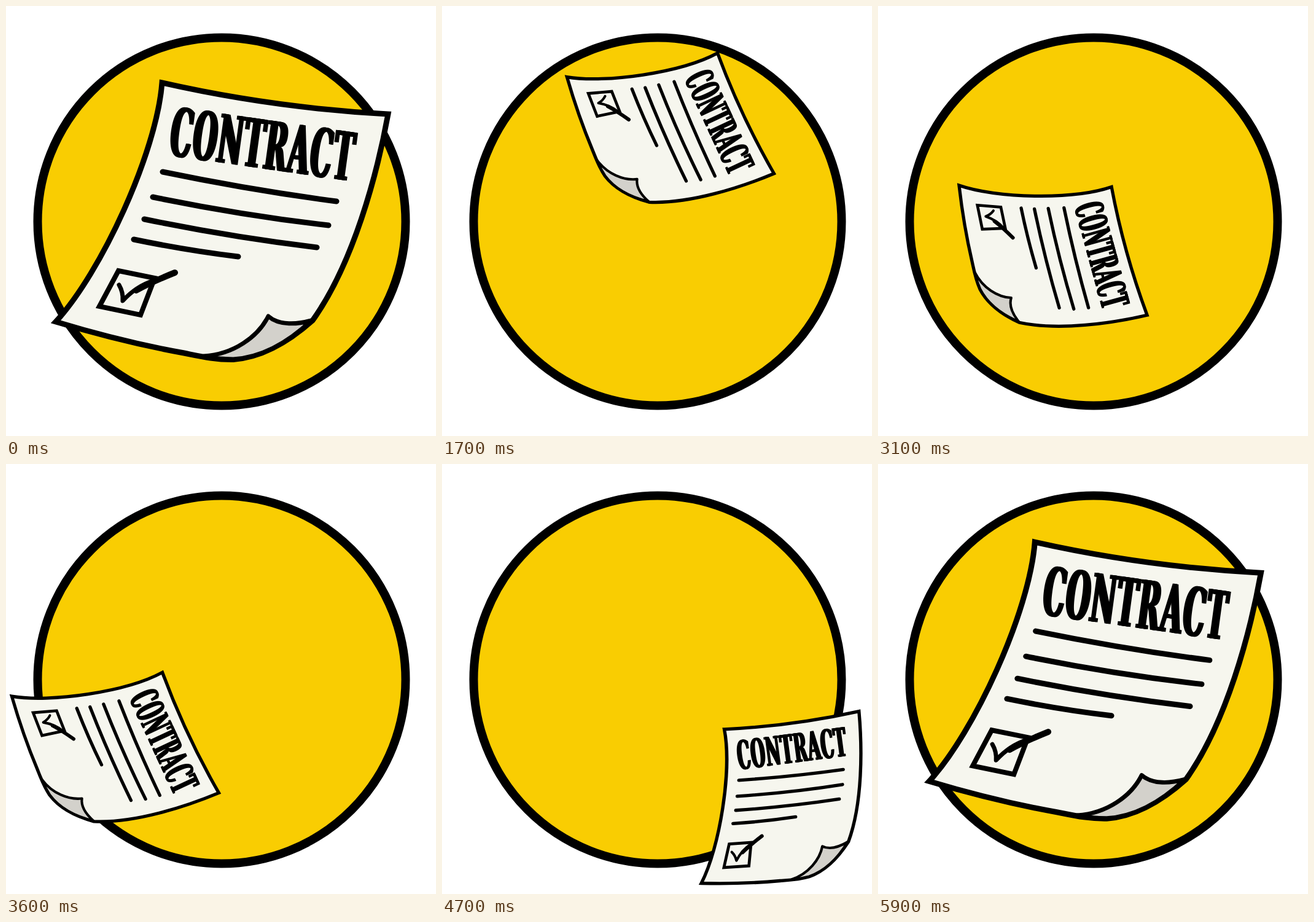
An HTML page that plays this animation: 700x700 px, repeating every 6000 ms.

```html
<!DOCTYPE html>
<html>
<head>
<meta charset="utf-8">
<style>
  html, body { margin: 0; width: 100%; height: 100%; overflow: hidden; background: #fff; }
  svg { display: block; width: 100vw; height: 100vh; }
  text { font: bold 100px "DejaVu Serif", serif; text-anchor: middle; letter-spacing: 4px; }
</style>
</head>
<body>
<svg viewBox="0 0 700 700">
  <circle cx="351" cy="351" r="299.5" fill="#f9cd02" stroke="#000" stroke-width="14"/>
  <g id="paper" fill="none" stroke="#000" stroke-width="9">
    <path fill="#f6f6ee" stroke-miterlimit="8" d="M254 125Q435 166 622 176C604 275 565 420 499 512
      C462 545 418 572 370 575.5C340 576 315 570 290 565Q190 547 81 514C155 434 245 239 254 125Z"/>
    <path fill="#d3d1cb" stroke-width="7" stroke-linejoin="round" d="M322 570C370 567 410 539 427 505
      C445 521 475 518 497 512C462 545 418 572 370 575Q345 575 322 570Z"/>
    <g transform="matrix(.44 .063 -.15 1.08 413 264)" fill="#000" stroke="none">
      <text id="title">CONTRACT</text>
      <use href="#title" x="-5"/>
      <use href="#title" x="5"/>
    </g>
    <g stroke-linecap="round">
      <path d="M255 270Q400 300 538 318M239 311Q385 341 525 357M225 347Q365 376 506 393M208 380Q295 398 378 408"/>
      <path stroke-width="8" d="M183 431L242 443L219 503L152 489Z"/>
      <path stroke-width="7" stroke-linejoin="round" d="M184 454Q191 466 190 480Q212 456 240 447"/>
      <path stroke-width="10" d="M212 463Q235 450 275 434"/>
    </g>
  </g>
</svg>
<script>
const LOOP = 6000, STEP = 100, SMALL = .583;

// Points of the flight: time, centre x, centre y, angle
const flight = [
  [450, 350, 350, 0],
  [800, 349, 349, 24.7],
  [1100, 368, 222, 45],
  [1400, 382, 130, 52],
  [1700, 369, 195, 57],
  [1800, 372, 196, 58],
  [2500, 545, 258, 106],
  [3100, 282, 398, 66.6],
  [3550, 173, 452, 58],
  [4100, 319.5, 510, 45.5],
  [4600, 557, 552, -16],
  [5300, 411, 410, -4.8],
  [6000, 350, 350, 0]
];

const slope = (i, c) => (flight[i + 1][c] - flight[i][c]) / (flight[i + 1][0] - flight[i][0]);

// Monotone tangent: flat at turning points and at both ends
function tangent(i, c) {
  if (i === 0 || i === flight.length - 1) return 0;
  const a = slope(i - 1, c), b = slope(i, c);
  return a * b <= 0 ? 0 : 2 * a * b / (a + b);
}

function valueAt(t, c) {
  if (t <= flight[0][0]) return flight[0][c];
  const i = flight.findIndex(p => p[0] > t) - 1;
  const a = flight[i], b = flight[i + 1];
  const span = b[0] - a[0], u = (t - a[0]) / span, v = 1 - u;
  return a[c] * v * v * (1 + 2 * u) + b[c] * u * u * (3 - 2 * u)
    + span * u * v * (v * tangent(i, c) - u * tangent(i + 1, c));
}

function smooth(from, to, t) {
  const u = Math.min(1, Math.max(0, (t - from) / (to - from)));
  return u * u * (3 - 2 * u);
}

const scaleAt = t => 1 - (1 - SMALL) * (smooth(530, 1200, t) - smooth(4580, 5750, t));

const paper = document.getElementById("paper");

function draw() {
  const t = Math.floor(performance.now() % LOOP / STEP) * STEP;
  const [x, y, angle] = [1, 2, 3].map(c => valueAt(t, c));
  paper.setAttribute("transform",
    `translate(${x} ${y}) rotate(${angle}) scale(${scaleAt(t)}) translate(-350 -350)`);
  requestAnimationFrame(draw);
}
draw();
</script>
</body>
</html>
```
